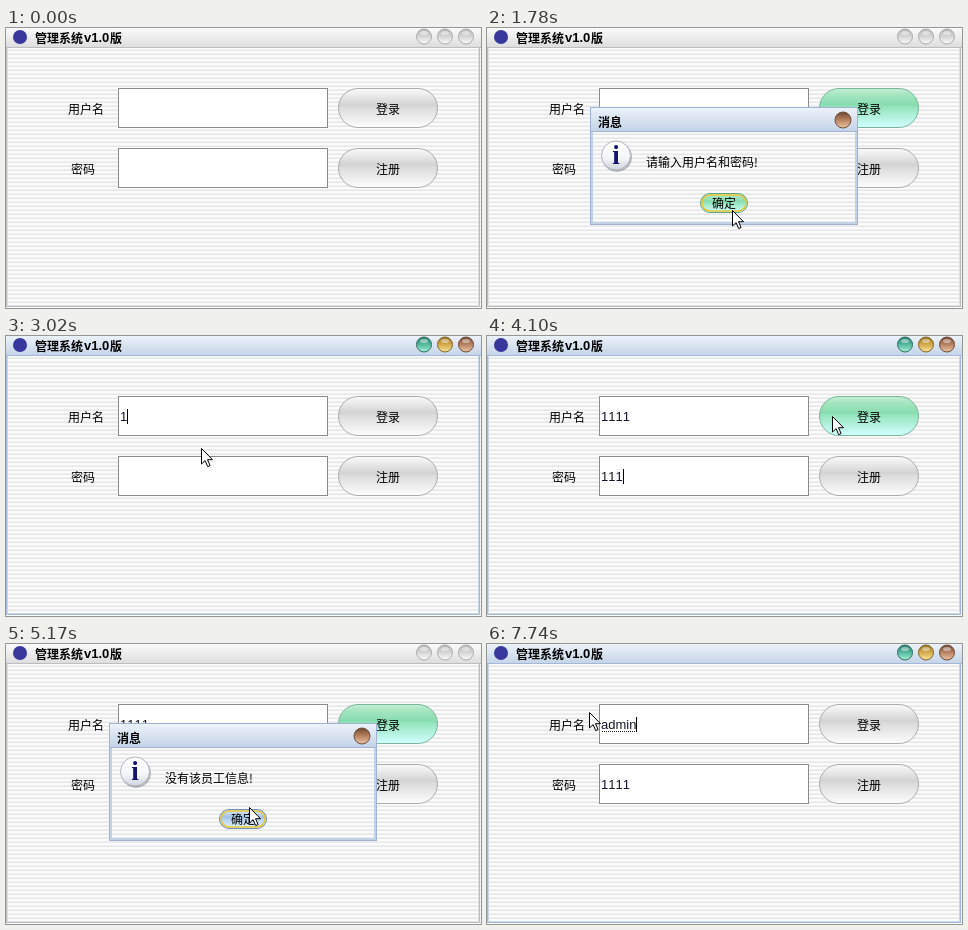
An HTML page that plays this animation: 475x280 px, repeating every 8 s.

```html
<!DOCTYPE html>
<html lang="zh">
<head>
<meta charset="utf-8">
<title>管理系统</title>
<style>
html, body { margin: 0; width: 100%; height: 100%; overflow: hidden; background: #fff; }
svg { display: block; width: 475px; height: 280px; }
text { font: 12px "Noto Sans CJK SC", "Noto Sans CJK", sans-serif; fill: #000; }
.bold { font-weight: bold; }
.latin { font: bold 13px "Liberation Sans", Arial, sans-serif; }
.typed { font: 13px "Liberation Sans", Arial, sans-serif; font-kerning: none; fill: #14142c; }
.mid { text-anchor: middle; }
.glow { mix-blend-mode: multiply; }
</style>
</head>
<body>
<svg viewBox="0 0 475 280" xmlns="http://www.w3.org/2000/svg">
  <defs id="defs">
    <pattern id="stripes" width="4" height="4" patternUnits="userSpaceOnUse">
      <rect width="4" height="4" fill="#fbfbfb"/>
      <rect width="4" height="1" y="1" fill="#efefef"/>
      <rect width="4" height="1" y="2" fill="#e7e7e7"/>
    </pattern>
  </defs>

  <rect width="475" height="280" fill="url(#stripes)"/>
  <g id="frame"></g>
  <circle cx="14" cy="9" r="7" fill="#38389c"/>
  <text class="bold" x="29" y="14.5">管理系统</text>
  <text class="latin" x="78" y="14">v1.0</text>
  <text class="bold" x="104" y="14.5">版</text>

  <text x="62" y="85.5">用户名</text>
  <text x="65" y="145.5">密码</text>
  <g fill="#fff" stroke="#8c8c8c">
    <rect x="112.5" y="60.5" width="209" height="39"/>
    <rect x="112.5" y="120.5" width="209" height="39"/>
  </g>
  <rect id="sel" x="114" y="73" width="29" height="15" fill="#bfd9f3"/>
  <text id="user" class="typed" x="114" y="85"></text>
  <text id="pass" class="typed" x="114" y="145"></text>
  <line id="compose" x1="115" y1="87.5" y2="87.5" stroke="#222" stroke-dasharray="1 1"/>
  <rect id="caret" width="1" height="15" fill="#000"/>

  <rect id="login" x="332.5" y="60.5" width="99" height="39" rx="19.5"/>
  <text class="mid" x="382" y="85.5">登录</text>
  <rect x="332.5" y="120.5" width="99" height="39" rx="19.5" fill="url(#grey)" stroke="#adadad"/>
  <text class="mid" x="382" y="145.5">注册</text>

  <g id="dialog">
    <rect x="103" y="79" width="268" height="118" fill="#9fb3d0"/>
    <rect x="104" y="80" width="266" height="116" fill="#c3d1e6"/>
    <rect x="106" y="104" width="262" height="90" fill="url(#stripes)"/>
    <rect x="104" y="80" width="266" height="23" fill="url(#barOn)"/>
    <rect x="104" y="103" width="266" height="1" fill="#9fb3d0"/>
    <text class="bold" x="111" y="98.5">消息</text>
    <circle cx="356" cy="92" r="8" fill="url(#brown)" stroke="#70503f"/>
    <circle cx="130" cy="129" r="15" fill="#000" opacity=".25"/>
    <circle cx="129" cy="127.5" r="14.5" fill="url(#ball)" stroke="#b0b4bc"/>
    <text x="129" y="136" class="mid" style="font:bold 27px 'Liberation Serif',serif;fill:#14146e">i</text>
    <text id="message" x="159" y="138.5"></text>
    <rect id="ok" x="213.5" y="165.5" width="47" height="19" rx="9.5"/>
    <rect x="215" y="167" width="44" height="16" rx="8" fill="none" stroke="#e8c63c" stroke-width="1.6"/>
    <text class="mid" x="237" y="180">确定</text>
  </g>

  <circle id="glow" class="glow" r="15" fill="#fbf77c"/>
  <path id="arrow" d="M.5.5V16l3.6-3.4 2.6 6 2.4-1-2.6-5.9h5z" fill="#fff" stroke="#000"/>
  <path id="beam" d="M-3 -7.5H-.7M.7 -7.5H3M0 -7V7M-3 7.5H-.7M.7 7.5H3" fill="none" stroke="#000"/>
</svg>
<script>
const $ = id => document.getElementById(id);
const LOOP = 8000;

// Gradients: id, then offset/colour pairs
const shades = {
  grey: [0, '#fafafa', .15, '#ededed', .42, '#d3d3d3', .5, '#dcdcdc', 1, '#fdfdfd'],
  green: [0, '#c6eed8', .15, '#a6e6c2', .42, '#88dcb0', .5, '#98e6c2', 1, '#d2ffff'],
  blue: [0, '#dbe8f6', .42, '#a3c1e4', .5, '#b2d0ee', 1, '#e2f7ff'],
  barOff: [0, '#fafafa', .5, '#ececec', 1, '#dcdcdc'],
  barOn: [0, '#edf2f9', .5, '#d8e2f0', 1, '#c5d3e8'],
  knob: [0, '#b5b5b5', .45, '#d2d2d2', 1, '#fbfbfb'],
  teal: [0, '#2c7d6a', .45, '#4db398', 1, '#a4f0d6'],
  gold: [0, '#94701c', .45, '#d0a444', 1, '#fbe59a'],
  brown: [0, '#704530', .45, '#b27c5c', 1, '#ecc4a4'],
  ball: [0, '#ffffff', .6, '#f4f5f8', 1, '#ced3dd']
};
for (const [id, stops] of Object.entries(shades)) {
  let body = '';
  for (let i = 0; i < stops.length; i += 2)
    body += `<stop offset="${stops[i]}" stop-color="${stops[i + 1]}"/>`;
  $('defs').insertAdjacentHTML('beforeend',
    `<linearGradient id="${id}" x2="0" y2="1">${body}</linearGradient>`);
}

function frameMarkup(active) {
  const edge = active ? '#a3b8d6' : '#bdbdbd';
  const inner = active ? '#cbd8ea' : '#dedede';
  const knobs = active ? ['teal', 'gold', 'brown'] : ['knob', 'knob', 'knob'];
  const rims = active ? ['#2e6e60', '#80642a', '#6c4a38'] : ['#acacac', '#acacac', '#acacac'];
  return `<rect width="475" height="20" fill="url(#${active ? 'barOn' : 'barOff'})"/>
    <path d="M0 19.5H475" stroke="${edge}"/>
    <path d="M1.5 20V277.5H472.5V20" fill="none" stroke="${inner}"/>
    <path d="M.5 19V278.5H473.5V19" fill="none" stroke="${edge}"/>` +
    knobs.map((k, i) => `<circle cx="${418 + i * 21}" cy="8.5" r="7.5" fill="url(#${k})" stroke="${rims[i]}"/>
      <ellipse cx="${418 + i * 21}" cy="5" rx="4" ry="2" fill="#fff" opacity=".45"/>`).join('');
}

// A straight pointer move shown as n evenly timed positions
function move(t0, t1, n, x0, y0, x1, y1) {
  return Array.from({ length: n }, (_, i) => {
    const p = n > 1 ? i / (n - 1) : 1;
    return [t0 + (t1 - t0) * p, Math.round(x0 + (x1 - x0) * p), Math.round(y0 + (y1 - y0) * p)];
  });
}

const pointer = [
  [0, -50, -50],
  ...move(70, 750, 10, 215, 205, 410, 94),
  [920, 387, 83],
  ...move(1380, 1620, 4, 368, 125, 280, 234),
  [1700, 258, 205], [1780, 245, 182], [1860, 243, 177], [1940, 242, 175],
  ...move(2160, 2630, 7, 238, 165, 190, 84),
  ...move(2710, 2870, 3, 190, 88, 193, 109),
  [2930, 195, 112],
  ...move(3700, 4100, 6, 218, 112, 345, 80),
  ...move(4180, 4490, 5, 351, 80, 375, 83),
  [4780, 377, 82],
  ...move(4940, 5170, 4, 350, 98, 243, 163),
  ...move(5420, 5870, 7, 241, 155, 210, 86),
  [6010, 210, 91], [6180, 207, 84], [6260, 88, 72], [6330, 83, 72],
  ...move(6570, 6710, 3, 89, 71, 102, 68)
];

const states = {
  active: [[0, 0], [1060, 1], [1230, 0], [2080, 1], [4550, 0], [5420, 1]],
  hover: [[0, 0], [525, 1], [2160, 0], [4020, 1], [5490, 0]],
  message: [[0, ''], [1230, '请输入用户名和密码!'], [2080, ''], [4630, '没有该员工信息!'], [5420, '']],
  ok: [[0, 'blue'], [1780, 'green'], [2080, 'blue'], [5340, 'green']],
  user: [[0, ''], [3020, '1'], [3100, '11'], [3180, '111'], [3240, '1111'],
    [7110, 'a'], [7190, 'ad'], [7430, 'adm'], [7570, 'admi'], [7740, 'admin']],
  pass: [[0, ''], [3400, '1'], [3480, '11'], [3540, '111'], [4180, '1111']],
  caret: [[0, ''], [2710, 'user'], [3320, 'pass'], [4550, ''], [5420, 'pass'],
    [6180, 'user'], [6260, 'start'], [7110, 'user']],
  selected: [[0, 0], [6260, 1], [7110, 0]],
  glow: [[0, 0], [6180, 1], [6400, 0]]
};

function at(steps, t) {
  let hit = steps[0];
  for (const s of steps) if (s[0] <= t) hit = s;
  return hit;
}
const show = (id, on) => $(id).setAttribute('visibility', on ? 'visible' : 'hidden');
function set(id, attrs) {
  for (const k in attrs) $(id).setAttribute(k, attrs[k]);
}

let wasActive = -1;
function draw(t) {
  const s = {};
  for (const k in states) s[k] = at(states[k], t)[1];
  if (s.active !== wasActive) {
    $('frame').innerHTML = frameMarkup(s.active);
    wasActive = s.active;
  }
  set('login', { fill: s.hover ? 'url(#green)' : 'url(#grey)', stroke: s.hover ? '#79b79b' : '#adadad' });
  set('ok', { fill: `url(#${s.ok})`, stroke: s.ok === 'green' ? '#5fa583' : '#6f8fb8' });
  show('dialog', s.message);
  $('message').textContent = s.message;

  $('user').textContent = s.user;
  $('pass').textContent = s.pass;
  const inPass = s.caret === 'pass';
  const width = s.caret === 'start' || !s.caret ? 0 : $(s.caret).getComputedTextLength();
  set('caret', { x: Math.round(114 + width), y: inPass ? 133 : 73 });
  show('caret', s.caret);
  show('sel', s.selected);
  show('compose', t >= 7110);
  set('compose', { x2: Math.round(114 + width) });

  const [, x, y] = at(pointer, t);
  const overField = !s.message && x > 112 && x < 322 && (y > 60 && y < 100 || y > 120 && y < 160);
  show('arrow', !overField);
  show('beam', overField);
  set(overField ? 'beam' : 'arrow', { transform: `translate(${x} ${y})` });
  set('glow', { cx: x, cy: y });
  show('glow', s.glow);
}

const begin = performance.now();
function tick() {
  draw((performance.now() - begin) % LOOP);
  requestAnimationFrame(tick);
}
tick();
</script>
</body>
</html>
```
